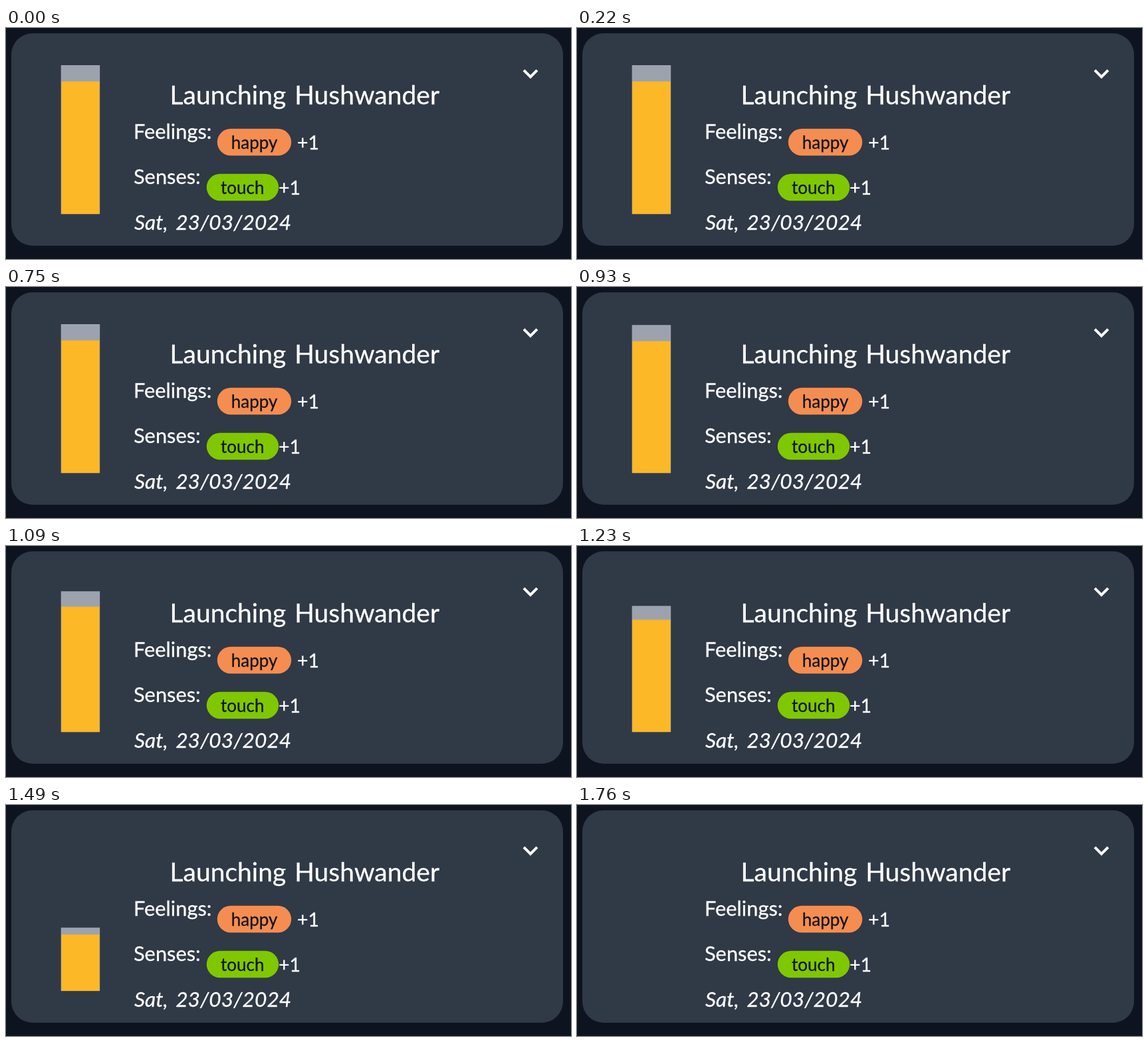
Animation, 850 px wide and 348 px high, one loop 1780 ms. Source, as an HTML page:

```html
<!DOCTYPE html>
<html lang="en">
<head>
<meta charset="utf-8">
<title>Dream card</title>
<style>
  html, body { margin: 0; width: 100%; height: 100%; overflow: hidden; background: #0d1420; }
  svg { display: block; width: 850px; height: 348px; }
  text { font-family: Lato, "Open Sans", sans-serif; fill: #fff; stroke: #fff; stroke-width: .3px; }
  .title { font-size: 39px; word-spacing: 3px; }
  .label { font-size: 30.8px; }
  .more { font-size: 28.5px; }
  .tag { font-size: 26px; text-anchor: middle; fill: #10151d; stroke: #10151d; }
  .date { font-size: 31.8px; font-style: italic; word-spacing: 4px; }
  .chevron { fill: none; stroke: #fff; stroke-width: 4; }

  .bar {
    transform-origin: 112px 280.2px;
    animation: drain 1780ms linear infinite;
  }
  /* full, then drains to the base and stays empty until the loop restarts */
  @keyframes drain {
    0% { transform: scaleY(1); }
    47.75% { transform: scaleY(1); animation-timing-function: cubic-bezier(.781, 0, .85, 1); }
    94.27%, 100% { transform: scaleY(0); }
  }
</style>
</head>
<body>
<svg viewBox="0 0 850 348">
  <rect x="8" y="8" width="830" height="320" rx="32" fill="#303946"/>

  <g class="bar">
    <rect x="82.7" y="56" width="58.5" height="224.2" fill="#9ca3af"/>
    <rect x="83.2" y="80.5" width="57.5" height="199.7" fill="#fdb827"/>
  </g>

  <path class="chevron" d="M779 63.6 789 73.6 799 63.6"/>
  <text class="title" x="246.5" y="115">Launching Hushwander</text>

  <text class="label" x="192" y="167">Feelings:</text>
  <rect x="317.8" y="151.8" width="111.4" height="40.4" rx="20.2" fill="#f58d51"/>
  <text class="tag" x="373.7" y="182">happy</text>
  <text class="more" x="438" y="183">+1</text>

  <text class="label" x="192" y="235">Senses:</text>
  <rect x="301.8" y="219.8" width="108.4" height="40.4" rx="20.2" fill="#7fc800"/>
  <text class="tag" x="355.7" y="250">touch</text>
  <text class="more" x="410" y="251">+1</text>

  <text class="date" x="193" y="303.5">Sat, 23/03/2024</text>
</svg>
</body>
</html>
```
